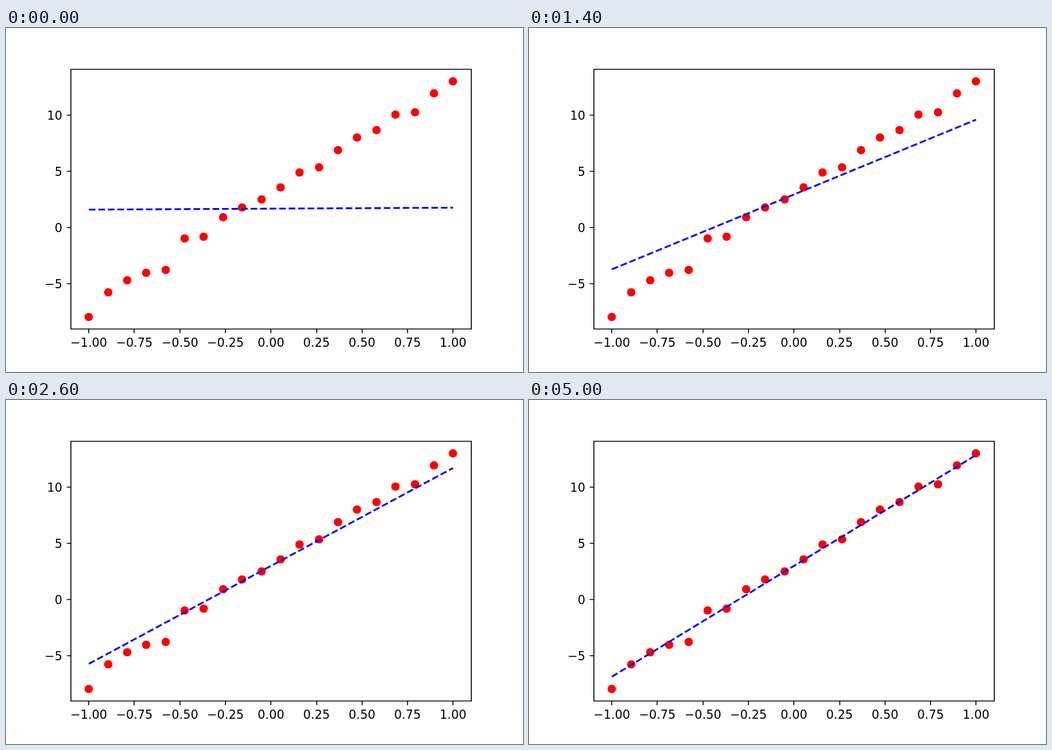
Animation of 900x600 px, one loop 5100 ms. Source, as an HTML page:

```html
<!DOCTYPE html>
<html lang="en">
<head>
<meta charset="utf-8">
<title>Line fit by gradient descent</title>
<style>
  html, body { margin: 0; width: 100%; height: 100%; overflow: hidden; background: #fefefe; }
  svg { display: block; }
  text { font: 20.83px "DejaVu Sans", sans-serif; }
  .axes { fill: none; stroke: #000; stroke-width: 1.667; }
  .fit { stroke: #00f; stroke-width: 3.125; stroke-dasharray: 11.5625 5; }
</style>
</head>
<body>
<svg id="plot" width="900" height="600" viewBox="0 0 900 600"></svg>
<script>
const STEP_MS = 100, STEPS = 51;
const sampleY = [504, 461, 440, 427, 422, 367, 364, 330, 313, 299,
                 278, 252, 243, 213, 191, 178, 151, 147, 114, 93];
const toX = x => 461.25 + 317.045 * x;
const toY = y => 348 - 19.6 * y;
const plot = document.getElementById('plot');

function add(tag, attrs, text = '') {
  const el = document.createElementNS('http://www.w3.org/2000/svg', tag);
  for (const name in attrs) el.setAttribute(name, attrs[name]);
  el.textContent = text;
  return plot.appendChild(el);
}

const label = (value, digits) => value.toFixed(digits).replace('-', '\u2212');

sampleY.forEach((cy, i) =>
  add('circle', { cx: Math.round(toX(-1 + 2 * i / 19)), cy, r: 7.29, fill: '#f00' }));

const fit = add('line', { class: 'fit', x1: toX(-1), x2: toX(1) });

let axes = 'M113 72H810V525H113Z';
for (let v = -1; v <= 1; v += 0.25) {
  const x = Math.round(toX(v));
  axes += `M${x} 525v7.3`;
  add('text', { x: toX(v), y: 556, 'text-anchor': 'middle' }, label(v, 2));
}
for (let v = -5; v <= 10; v += 5) {
  const y = Math.round(toY(v));
  axes += `M113 ${y}h-7.3`;
  add('text', { x: 98, y: y + 8, 'text-anchor': 'end' }, label(v, 0));
}
add('path', { class: 'axes', d: axes });

// Slope and offset each decay geometrically towards the least-squares line.
function draw(now) {
  const n = Math.floor(now / STEP_MS) % STEPS;
  const middle = 289.3 + 25.8 * 0.8 ** n;
  const rise = 197.6 - 195.9 * 0.92632 ** n;
  fit.setAttribute('y1', middle + rise);
  fit.setAttribute('y2', middle - rise);
}

const start = performance.now();
function tick() {
  draw(performance.now() - start);
  requestAnimationFrame(tick);
}
tick();
</script>
</body>
</html>
```
